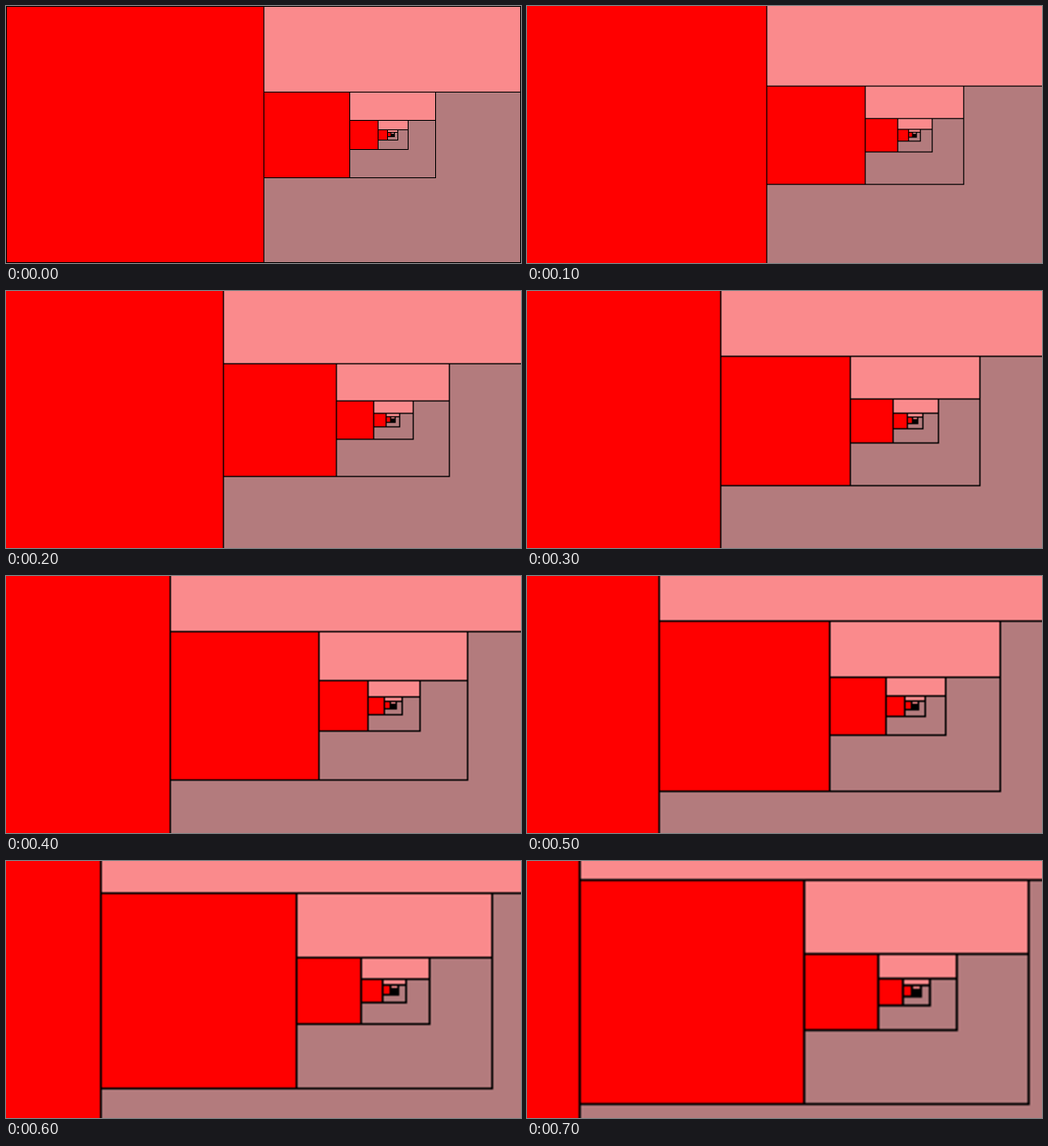
An HTML page with a canvas that plays this animation: 600x300 px, repeating every 800 ms.

```html
<!DOCTYPE html>
<html lang="en">
<head>
<meta charset="utf-8">
<title>Endless thirds</title>
<style>
  html, body { margin: 0; width: 100%; height: 100%; overflow: hidden; }
  canvas { display: block; }
</style>
</head>
<body>
<canvas id="stage" width="600" height="300"></canvas>
<script>
const W = 600, H = 300, STEPS = 8, STEP_MS = 100;
const RED = '#ff0000', PINK = '#fa8a8c', MAUVE = '#b37b7d';

// Nested panels: x, y, width, height, snapped to whole pixels.
const panels = [
  [0, 0, 599, 299],
  [300, 100, 200, 100],
  [400, 133, 68, 34],
  [433, 144, 23, 12],
  [444, 147, 8, 5],
  [448, 149, 3, 2],
  [449, 149, 1, 1]
];

const ctx = document.getElementById('stage').getContext('2d');
const art = document.createElement('canvas');
art.width = W;
art.height = H;
const pen = art.getContext('2d');

function box(x, y, w, h, fill) {
  pen.fillStyle = '#000';
  pen.fillRect(x, y, w + 1, h + 1);
  if (w < 2 || h < 2) return;
  pen.fillStyle = fill;
  pen.fillRect(x + 1, y + 1, w - 1, h - 1);
}

function drawArt() {
  panels.forEach(([x, y, w, h], i) => {
    box(x, y, w, h, MAUVE);
    if (i === panels.length - 1) return;
    const [nx, ny] = panels[i + 1];
    box(x, y, nx - x, h, RED);
    box(nx, y, x + w - nx, ny - y, PINK);
  });
}

// Zoom by 3 per loop towards (450, 150), with the crop corner on whole pixels.
function draw(step) {
  const scale = 3 ** (step / STEPS);
  const left = Math.floor(450 - 450 / scale);
  const top = Math.floor(150 - 150 / scale);
  ctx.imageSmoothingEnabled = step > 0;
  ctx.imageSmoothingQuality = 'high';
  ctx.drawImage(art, left, top, W / scale, H / scale, 0, 0, W, H);
}

drawArt();
draw(0);
const start = performance.now();
function tick() {
  const t = performance.now() - start;
  draw(Math.floor(t / STEP_MS) % STEPS);
  requestAnimationFrame(tick);
}
requestAnimationFrame(tick);
</script>
</body>
</html>
```
